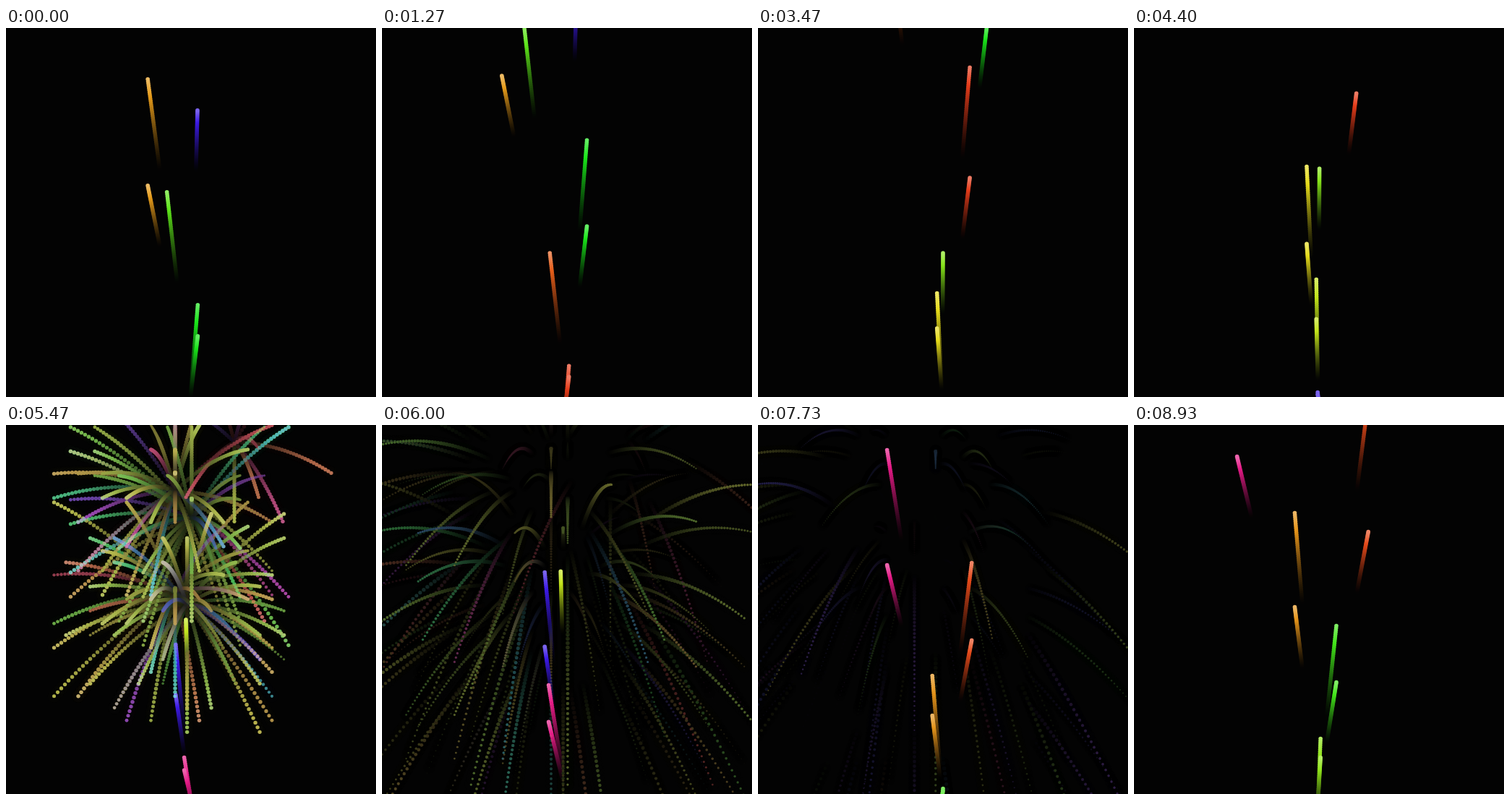
These frames come from a looping animation (512 px wide and 510 px high, 8990 ms). An HTML page with a canvas:

```html
<!DOCTYPE html>
<html lang="en">
<head>
<meta charset="utf-8">
<title>Fireworks</title>
<style>
  html, body { margin: 0; width: 100%; height: 100%; overflow: hidden; background: #000; }
  canvas { display: block; }
</style>
</head>
<body>
<canvas id="sky" width="512" height="510"></canvas>
<script>
const sky = document.getElementById('sky');
const ctx = sky.getContext('2d');
const LOOP = 8990, FRAMES = 135, TICKS_PER_FRAME = 4.167;
const LAUNCH_X = 255, LAUNCH_Y = 512, FIRST_LAUNCH = -195.7, LAUNCH_GAP = 52;
const BURST_TICKS = [308.3, 405.3], BURST_HEIGHT = 255;
const GRAVITY = 0.0755, TRAIL = 42, SPARKS = 45;

// Per launch: sideways drift in hundredths of a pixel per tick, and hue
const drifts = [5, -40, -34, 24, -34, 25, 1, -15, -5, -29, -48, 38, -25, 32, 12];
const hues = [250, 38, 100, 120, 20, 10, 88, 57, 70, 250, 328, 14, 36, 108, 85];

let seed = 20;
function random() {
  seed = (seed * 16807) % 2147483647;
  return seed / 2147483647;
}
const randomStep = () => Math.floor(random() * 10) - 5;

// Rockets climb in pairs, except every other one of the early launches
function climbSpeeds(i) {
  if (i % 2 || i > 6) return [3, 2];
  return i % 6 ? [3] : [2];
}

const rockets = drifts.flatMap((drift, i) => climbSpeeds(i).map(speed => ({
  drift: drift / 100, speed, hue: hues[i],
  start: FIRST_LAUNCH + i * LAUNCH_GAP, end: Infinity
})));

function rocketAt(rocket, tick) {
  const n = tick - rocket.start;
  return [LAUNCH_X + rocket.drift * n, LAUNCH_Y - rocket.speed * n];
}

function burst(rocket, tick, x, y) {
  const count = SPARKS * Math.min(1, y / 100);
  for (let i = 0; i < count; i++) {
    const anyHue = random() < 0.35;
    sparks.push({
      x, y, start: tick,
      vx: randomStep(), vy: randomStep(),
      life: 48 + random() * 50,
      hue: anyHue ? random() * 360 : rocket.hue + random() * 40 - 20
    });
  }
}

// Every rocket in the upper half bursts at once
const sparks = [];
for (const tick of BURST_TICKS) {
  for (const rocket of rockets) {
    if (rocket.start > tick || rocket.end < tick) continue;
    const [x, y] = rocketAt(rocket, tick);
    if (y < 0 || y > BURST_HEIGHT) continue;
    rocket.end = tick;
    burst(rocket, tick, x, y);
  }
}

function dot(x, y, radius, color) {
  if (x < -10 || x > 522 || y < -10 || y > 520) return;
  ctx.fillStyle = color;
  ctx.beginPath();
  ctx.arc(x, y, radius, 0, 2 * Math.PI);
  ctx.fill();
}

// Visits each glowing dot of every spark, oldest first
function eachSparkDot(tick, paint) {
  for (const s of sparks) {
    const n = tick - s.start;
    if (n < 0 || n > s.life + TRAIL) continue;
    for (let age = TRAIL - 1; age >= 0; age--) {
      const m = n - age;
      if (m < 0 || m > s.life) continue;
      const x = s.x + s.vx * m;
      const y = s.y + s.vy * m + GRAVITY * m * m / 2;
      paint(s.hue, x, y, 1 - m / s.life, 1 - age / TRAIL);
    }
  }
}

function drawSparks(tick) {
  ctx.globalCompositeOperation = 'source-over';
  eachSparkDot(tick, (hue, x, y, left, fade) =>
    dot(x, y, 9, `hsla(${hue}, 25%, 25%, ${0.045 * left * fade})`));

  // Lightening keeps overlapping dots from piling up
  ctx.globalCompositeOperation = 'lighten';
  eachSparkDot(tick, (hue, x, y, left, fade) => {
    const light = 62 * Math.min(1, 1.5 * left) * fade ** 1.5;
    dot(x, y, Math.min(2.7, 0.4 + 4 * left), `hsl(${hue}, 42%, ${light}%)`);
  });
}

function drawRocket(rocket, tick) {
  for (let age = TRAIL; age >= 0; age--) {
    const at = tick - age;
    if (at < rocket.start || at > rocket.end) continue;
    const [x, y] = rocketAt(rocket, at);
    const light = 66 * (1 - age / (TRAIL + 1)) ** 1.4;
    dot(x, y, 2.8, `hsl(${rocket.hue}, 80%, ${light}%)`);
  }
}

function draw(tick) {
  ctx.globalCompositeOperation = 'source-over';
  ctx.fillStyle = '#030303';
  ctx.fillRect(0, 0, sky.width, sky.height);
  drawSparks(tick);
  for (const rocket of rockets) drawRocket(rocket, tick);
}

let shown = -1;
function play() {
  const frame = Math.floor((performance.now() % LOOP) / LOOP * FRAMES);
  if (frame !== shown) {
    shown = frame;
    const headStart = Math.max(0, 3.3 - 0.3 * frame);
    draw(frame * TICKS_PER_FRAME + 0.1 + headStart);
  }
  requestAnimationFrame(play);
}
play();
</script>
</body>
</html>
```
